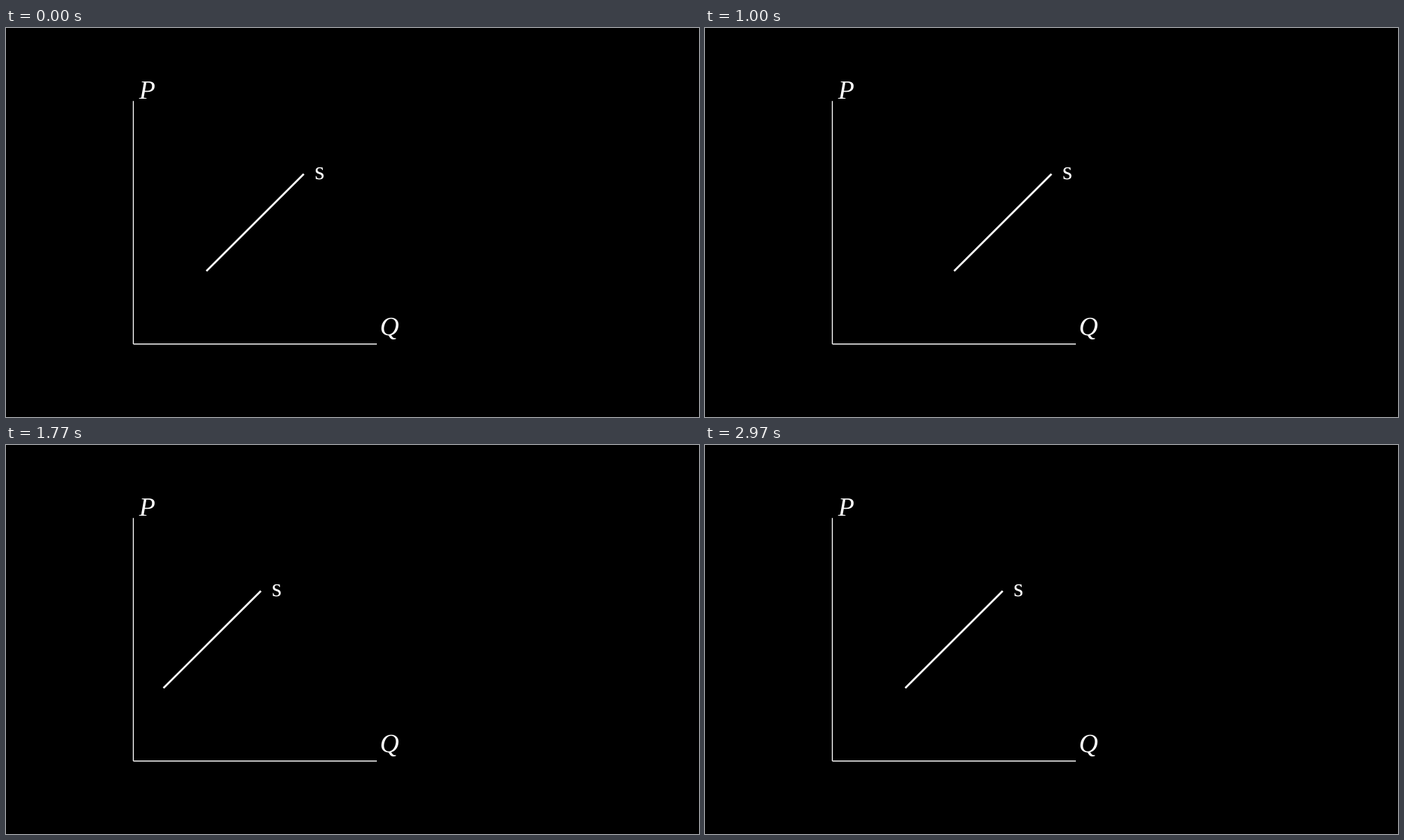
These frames come from a looping animation (998 px wide and 561 px high, 3010 ms). An HTML page:

```html
<!DOCTYPE html>
<html lang="en">
<head>
<meta charset="utf-8">
<title>Supply shift</title>
<style>
  html, body { margin: 0; width: 100%; height: 100%; overflow: hidden; background: #000; }
  svg { display: block; width: 998px; height: 561px; }
  path { fill: none; stroke: #fff; }
  text {
    fill: #fff;
    font-family: "Liberation Serif", "Times New Roman", serif;
    text-rendering: geometricPrecision;
  }
  .axes { stroke-width: 1.4; }
  .curve { stroke-width: 2.8; }
  .axis-name { font-size: 38px; font-style: italic; }
  .curve-name { font-size: 36.5px; }
</style>
</head>
<body>
<svg viewBox="0 0 998 561">
  <path class="axes" d="M183.4 105.2V455.8M183.4 455.8H534.1"/>
  <text class="axis-name" x="191.8" y="102.2">P</text>
  <text class="axis-name" x="538.6" y="443">Q</text>
  <g id="supply">
    <path class="curve" d="M288.6 350.6L428.9 210.4"/>
    <text class="curve-name" x="444.5" y="218.4">s</text>
  </g>
</svg>
<script>
  const LOOP = 3010;
  const FPS = 30;
  const UNIT = 70.125;
  const STOPS = [0, 1, -1, 0]; // one second between neighbours

  const supply = document.getElementById("supply");
  const sigmoid = x => 1 / (1 + Math.exp(-x));

  // Logistic ease, rescaled to run exactly from 0 to 1
  function smooth(t) {
    const edge = sigmoid(-5);
    return (sigmoid(10 * (t - 0.5)) - edge) / (1 - 2 * edge);
  }

  function shiftAt(ms) {
    // Steps begin at multiples of 1/30 s rounded to 10 ms
    const step = Math.min(Math.floor((ms + 3.4) * FPS / 1000), 3 * FPS - 1);
    const leg = Math.floor(step / FPS);
    const from = STOPS[leg], to = STOPS[leg + 1];
    return UNIT * (from + (to - from) * smooth(step % FPS / FPS));
  }

  const start = performance.now();
  function draw() {
    const ms = (performance.now() - start) % LOOP;
    supply.setAttribute("transform", `translate(${shiftAt(ms).toFixed(3)} 0)`);
    requestAnimationFrame(draw);
  }
  draw();
</script>
</body>
</html>
```
